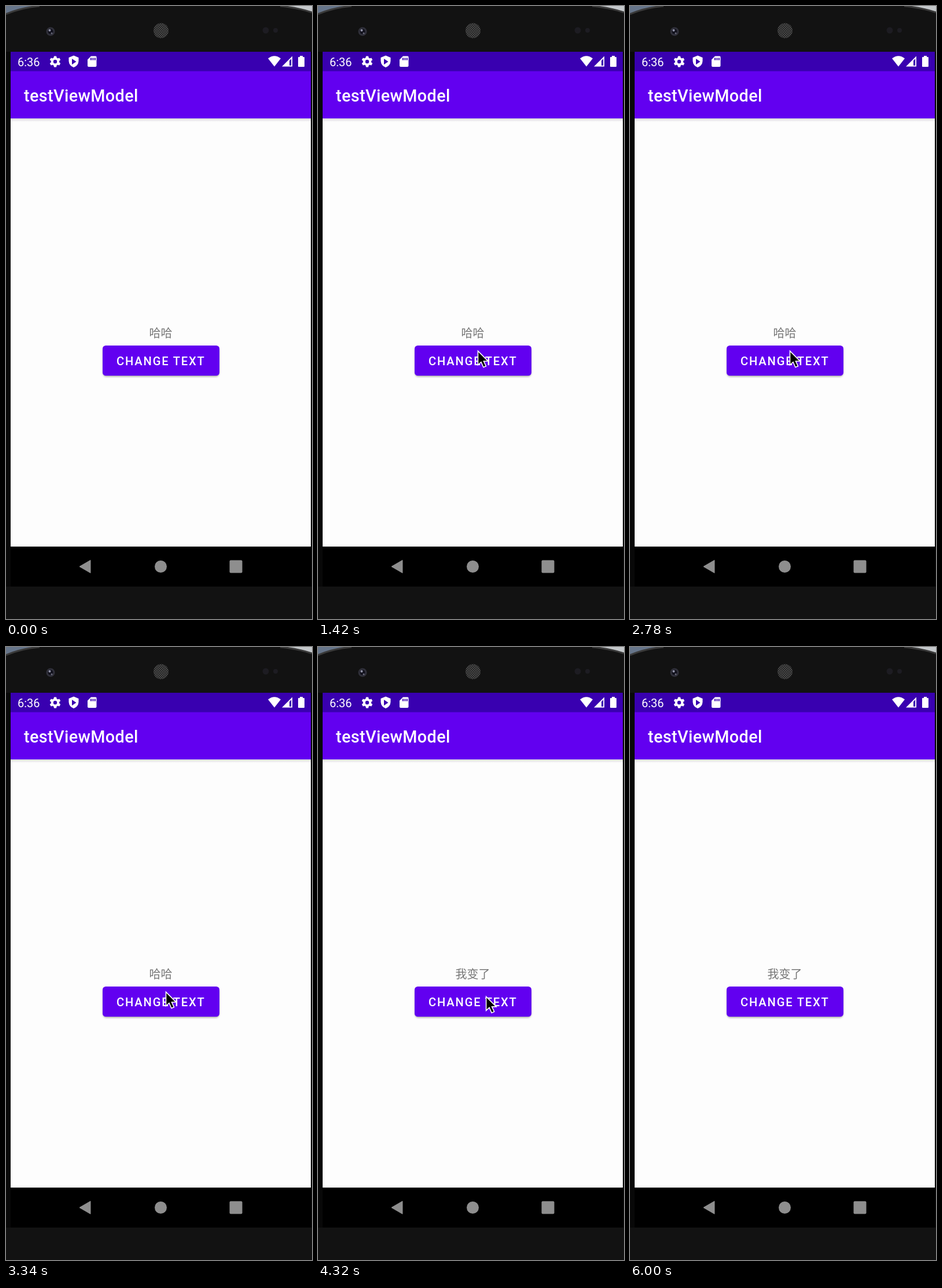
Recreate the animation shown at these times as an HTML page. Size 529 by 1058 pixels, loop 6.1 s.

```html
<!DOCTYPE html>
<html lang="en">
<head>
<meta charset="utf-8">
<style>
  html, body { margin: 0; width: 100%; height: 100%; overflow: hidden; background: #111; }
  svg { display: block; width: 100vw; height: 100vh; }
  text { font-family: Roboto, sans-serif; fill: #fff; }
  #label { font-family: "Noto Sans CJK SC", "Noto Sans CJK", sans-serif; font-size: 20px; fill: #757575; text-anchor: middle; }
  .medium { font-weight: 500; }
</style>
</head>
<body>
<svg viewBox="0 0 529 1058">
  <defs>
    <pattern id="mesh" width="4" height="4" patternUnits="userSpaceOnUse">
      <circle cx="1" cy="1" r="1" fill="#555"/>
      <circle cx="3" cy="3" r="1" fill="#555"/>
    </pattern>
    <linearGradient id="shade" x2="0" y2="1">
      <stop stop-color="#000" stop-opacity=".14"/>
      <stop offset="1" stop-color="#000" stop-opacity="0"/>
    </linearGradient>
    <filter id="soft" x="-10%" y="-20%" width="120%" height="150%"><feGaussianBlur stdDeviation="1.6"/></filter>
    <clipPath id="buttonClip"><rect x="167" y="586" width="202" height="52" rx="5.5"/></clipPath>
  </defs>

  <!-- Phone body -->
  <path d="M0 0H58Q25 3 0 14Z" fill="#66758a"/>
  <path d="M474 0H529V11Q505 3 474 0Z" fill="#c4c8cb"/>
  <path d="M0 14Q25 3 58 0H474Q505 3 529 11V1058H0Z" fill="#121212"/>
  <path d="M0 14Q25 3 58 0M474 0Q505 3 529 11" fill="none" stroke="#3a3a3a" stroke-width="3"/>
  <path d="M0 79H8V1002H0ZM527 79H529V1002H527Z" fill="#080808"/>
  <circle cx="77" cy="44" r="7.5" fill="#30303a"/>
  <circle cx="77" cy="44" r="4.5" fill="#11111c"/>
  <circle cx="75.5" cy="42" r="2" fill="#9294a8"/>
  <circle cx="79" cy="47" r="1.5" fill="#686878"/>
  <circle cx="268" cy="42.5" r="13" fill="#252525"/>
  <circle cx="268" cy="42.5" r="13" fill="url(#mesh)"/>
  <g fill="#1d1c22"><circle cx="449" cy="42" r="5.5"/><circle cx="466" cy="42" r="4"/></g>

  <!-- Screen -->
  <rect x="8" y="79" width="519" height="854" fill="#fdfdfd"/>
  <rect x="8" y="194" width="519" height="6" fill="url(#shade)"/>
  <rect x="8" y="79" width="519" height="34" fill="#3900b0"/>
  <rect x="8" y="112.5" width="519" height="81.5" fill="#6200f0"/>
  <rect x="8" y="933" width="519" height="69" fill="#000"/>

  <!-- Status bar -->
  <text x="20" y="103.5" font-size="20">6:36</text>
  <g fill="#fff">
    <g transform="translate(85 96)">
      <g id="teeth"></g>
      <circle r="5.2" fill="none" stroke="#fff" stroke-width="4"/>
    </g>
    <path fill-rule="evenodd" d="M117 85.5L125.5 89V95Q125 103 117 106Q109 103 108.500 95V89ZM114 91V101L121.500 96Z"/>
    <path fill-rule="evenodd" d="M147 86.500H155Q156.500 86.500 156.500 88V103Q156.500 105 154.500 105H143Q141 105 141 103V92.500ZM146 89.500V93.500H148V89.500ZM149.400 89.500V93.500H151.400V89.500ZM152.800 89.500V93.500H154.800V89.500Z"/>
    <path d="M453 90.500Q464 82 475 90.500L464 104.500Z"/>
    <path fill-rule="evenodd" d="M477 104.500L495 86.500V104.500ZM490 94.300V102.700H493.200V91Z"/>
    <path d="M508 86H513V88H515Q516 88 516 89V104Q516 105 515 105H506Q505 105 505 104V89Q505 88 506 88H508Z"/>
  </g>
  <text class="medium" x="31" y="164.500" font-size="28.8" letter-spacing=".36">testViewModel</text>

  <!-- Content -->
  <text id="label" x="267.500" y="571.500">哈哈</text>
  <rect x="167.500" y="589" width="201" height="51" rx="6" fill="#000" opacity=".3" filter="url(#soft)"/>
  <g clip-path="url(#buttonClip)">
    <rect x="167" y="586" width="202" height="52" fill="#6200f0"/>
    <circle id="ripple" cx="276" cy="597" fill="#8a1ff5"/>
  </g>
  <text class="medium" x="191" y="619.500" font-size="20.2" letter-spacing="1.8">CHANGE TEXT</text>

  <!-- Navigation -->
  <g fill="#8e8e8e">
    <path d="M127 967.500L146 956.500V978.500Z" stroke="#8e8e8e" stroke-linejoin="round"/>
    <circle cx="267.500" cy="967.500" r="10.500"/>
    <rect x="386.500" y="956.500" width="22" height="22" rx="2"/>
  </g>

  <path id="cursor" d="M0 0V24L5.500 19L9.500 28L14 26L10 17.500H17.500Z" fill="#000" stroke="#fff" stroke-width="1.6"/>
</svg>
<script>
  const LOOP = 6100;
  const get = id => document.getElementById(id);
  const label = get("label"), ripple = get("ripple"), cursor = get("cursor");
  const progress = (t, from, to) => Math.min(1, Math.max(0, (t - from) / (to - from)));

  get("teeth").innerHTML = [0, 60, 120, 180, 240, 300].map(angle =>
    `<path d="M-2.700 -6L-2 -9.500H2L2.700 -6Z" transform="rotate(${angle})"/>`).join("");

  // Pointer stops: time, x, y
  const stops = [
    [420, 535, 404], [720, 298.500, 579.500], [1050, 276.500, 595.500],
    [4250, 276.500, 595.500], [4750, 535, 740]
  ];

  function pointerAt(t) {
    const i = stops.findIndex(stop => stop[0] > t);
    if (i < 1) return null;
    const [t0, x0, y0] = stops[i - 1], [t1, x1, y1] = stops[i];
    const p = progress(t, t0, t1), k = p * p * (3 - 2 * p);
    return [x0 + (x1 - x0) * k, y0 + (y1 - y0) * k];
  }

  function draw(now) {
    const t = now % LOOP;
    const pointer = pointerAt(t);
    cursor.style.display = pointer ? "" : "none";
    if (pointer) cursor.setAttribute("transform", `translate(${pointer})`);
    label.textContent = t < 3700 ? "哈哈" : "我变了";
    ripple.setAttribute("r", 125 * progress(t, 3600, 3850));
    ripple.setAttribute("opacity", 1 - progress(t, 3910, 4100));
    requestAnimationFrame(draw);
  }

  const start = performance.now();
  requestAnimationFrame(() => draw(0));
  function draw0() {}
</script>
</body>
</html>
```
